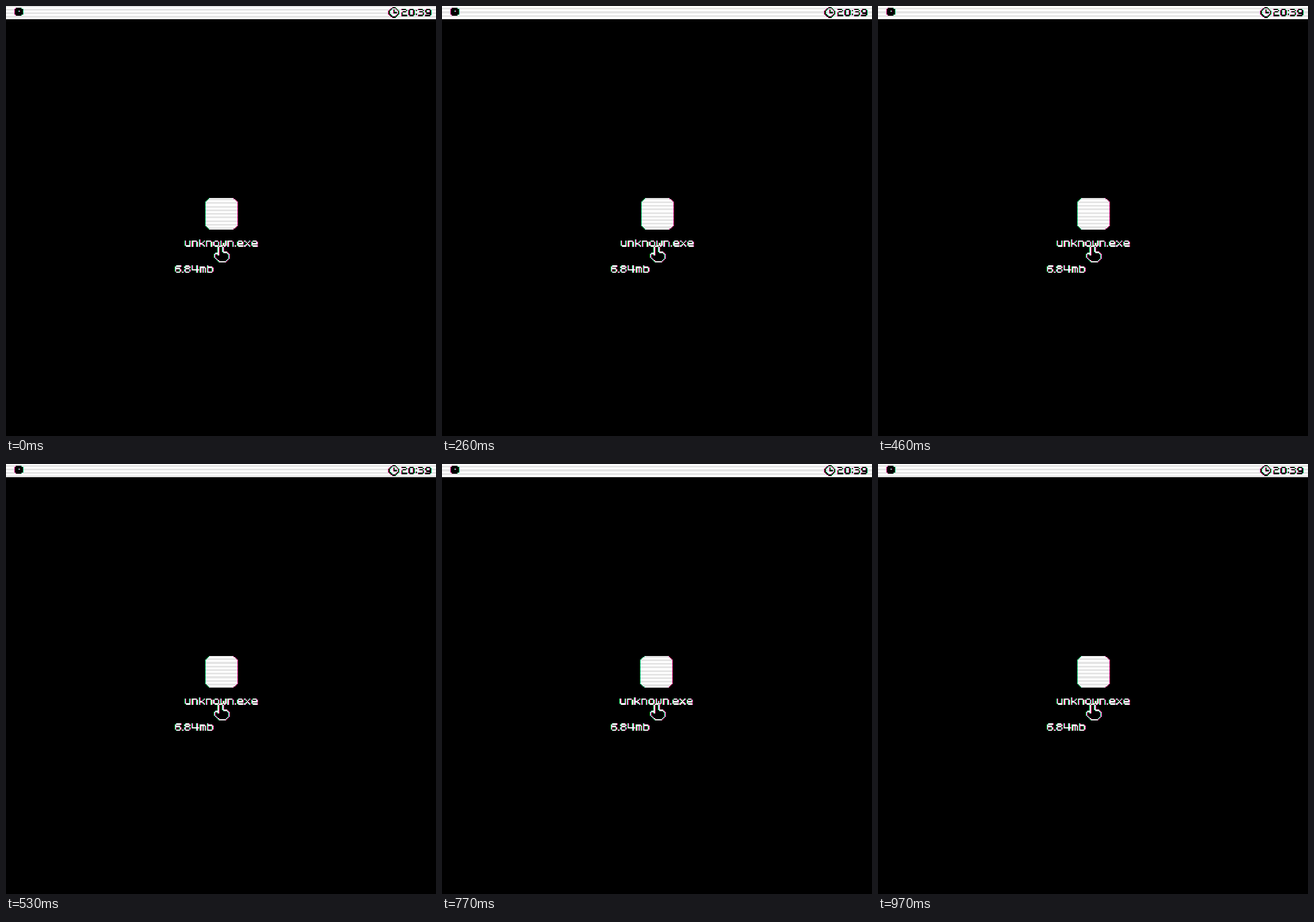
Recreate the animation shown at these times as an HTML page. Size 748 px wide and 748 px high, loop 1.04 s.

```html
<!DOCTYPE html>
<html lang="en">
<head>
<meta charset="utf-8">
<title>Desktop</title>
<style>
html, body { margin: 0; width: 100%; height: 100%; overflow: hidden; background: #000; }
svg { display: block; width: 100vw; height: 100vh; isolation: isolate; }
.channel { mix-blend-mode: screen; }
.pixels { fill: none; stroke-width: 1.2; stroke-linecap: square; }
text { fill: transparent; font: 12px "DejaVu Sans Mono", monospace; }
</style>
</head>
<body>
<svg id="stage" viewBox="0 0 748 748" shape-rendering="crispEdges">
  <rect width="748" height="748"/>
  <g id="channels"></g>
  <path id="lines" stroke="#000" stroke-opacity=".1" stroke-width="3.1"/>
  <g id="words">
    <text x="310" y="418">unknown.exe</text>
    <text x="293" y="463">6.84mb</text>
    <text x="687" y="17">20:39</text>
  </g>
</svg>
<script>
// The desktop is 360 cells wide
const LOOP = 1040, UNIT = 748 / 360, PERIOD = 3 * UNIT;

// Strokes on a grid six cells high, baseline in row 5
const GLYPHS = {
  u: "M0 1V4M1 5H4M4 1V5",
  n: "M0 1V5M1 1H3M4 2V5",
  k: "M0 0V5M1 3H2M3 2h0M4 1h0M3 4h0M4 5h0",
  o: "M1 1H3M0 2V4M4 2V4M1 5H3",
  w: "M0 1V4M2 3V4M4 1V4M1 5h0M3 5h0",
  e: "M1 1H3M0 2V4M4 2h0M1 3H4M1 5H4",
  x: "M0 1h0M4 1h0M1 2h0M3 2h0M2 3h0M1 4h0M3 4h0M0 5h0M4 5h0",
  m: "M0 1V5M1 1H3M2 2V5M4 2V5",
  b: "M0 0V5M1 1H3M4 2V4M1 5H3",
  0: "M1 0H3M0 1V4M4 1V4M1 5H3",
  2: "M0 0H3M4 1h0M1 2H3M0 3V4M0 5H4",
  3: "M0 0H3M4 1h0M1 2H3M4 3V4M0 5H3",
  4: "M0 0V2M0 3H5M4 0V5",
  6: "M1 0H4M0 1V4M1 2H3M4 3V4M1 5H3",
  8: "M1 0H3M0 1h0M4 1h0M1 2H3M0 3V4M4 3V4M1 5H3",
  9: "M1 0H3M0 1V2M4 1V4M1 3H3M0 5H3",
  ".": "M0 5h0",
  ":": "M0 1h0M0 4h0"
};
const CLOCK = "M3 0H5M3 8H5M0 3V5M8 3V5M2 1h0M1 2h0M6 1h0M7 2h0" +
  "M1 6h0M2 7h0M7 6h0M6 7h0M4 2V4M5 4H6";
const HAND = "M4 0H6M3 1V7M7 1V4M8 5H10M11 6h0M12 7V10M11 11h0M10 12h0" +
  "M4 13H9M3 12h0M2 11h0M1 10h0M0 7V9M1 6H2";
const HAND_BODY = "M4 0H6L7 1V5H10L12 7V10L9 13H4L0 9V7L1 6H3V1Z";

function pixels(path, x, y, color, body = "") {
  const inside = body && `<path d="${body}" fill="#000" stroke="none"/>`;
  return `<g class="pixels" stroke="${color}" transform="translate(${x} ${y}) ` +
    `scale(${UNIT}) translate(.5 .5)">${inside}<path d="${path}"/></g>`;
}

const advance = c => c === "." || c === ":" ? 2 : c === "4" ? 7 : 6;

function lettering(word, x, y, color) {
  let out = "";
  for (const c of word) {
    out += pixels(GLYPHS[c], x, y, color);
    x += UNIT * advance(c);
  }
  return out;
}

// Box with corners cut in steps of one cell
function steppedBox(x, y, w, h, cut, color) {
  let out = "";
  for (let i = 0; i <= cut; i++) {
    const dx = (cut - i) * UNIT, dy = i * UNIT;
    out += `<rect x="${x + dx}" y="${y + dy}" width="${w - 2 * dx}" height="${h - 2 * dy}" fill="${color}"/>`;
  }
  return out;
}

function scene(color) {
  return `<rect x="-4" width="756" height="${11 * UNIT}" fill="${color}"/>
    ${steppedBox(15, 2.5, 7 * UNIT, 7 * UNIT, 1, "#000")}
    <rect x="22" y="8" width="2" height="2" fill="${color}"/>
    ${pixels(CLOCK, 665.5, 2, "#000")}
    ${lettering("20:39", 687.8, 5, "#000")}
    <g class="icon">
      ${steppedBox(346.6, 334, 27 * UNIT, 55, 3, color)}
      ${lettering("unknown.exe", 310.8, 406, color)}
    </g>
    ${lettering("6.84mb", 294, 451.5, color)}
    ${pixels(HAND, 362, 417, color, HAND_BODY)}`;
}

// Colour fringes: each channel sits slightly to one side
const CHANNELS = [["#f00", .5], ["#0f0", -.5], ["#00f", 0]];
document.getElementById("channels").innerHTML = CHANNELS.map(([color, dx]) =>
  `<g class="channel" transform="translate(${dx} 0)">${scene(color)}</g>`).join("");

const icons = document.querySelectorAll(".icon");
const lines = document.getElementById("lines");
let rows = "";
for (let y = -PERIOD; y < 400; y += PERIOD) rows += `M0 ${y}H748`;
lines.setAttribute("d", rows);

// Start time and vertical offset of the scan lines
const SCAN = [[0, 6.3], [60, 4.8], [130, 3.2], [260, 4.8], [330, 6.3], [460, 4.8],
  [530, 3.2], [700, 6.3], [770, 4.8], [900, 3.2]];

function draw(t) {
  const shift = SCAN.filter(([start]) => start <= t).pop()[1];
  lines.setAttribute("transform", `translate(0 ${shift})`);
  const jitter = t >= 700 && t < 970 ? -1.3 : 0;
  icons.forEach(icon => icon.setAttribute("transform", `translate(${jitter} 0)`));
}

function tick() {
  draw(performance.now() % LOOP);
  requestAnimationFrame(tick);
}
tick();
</script>
</body>
</html>
```
